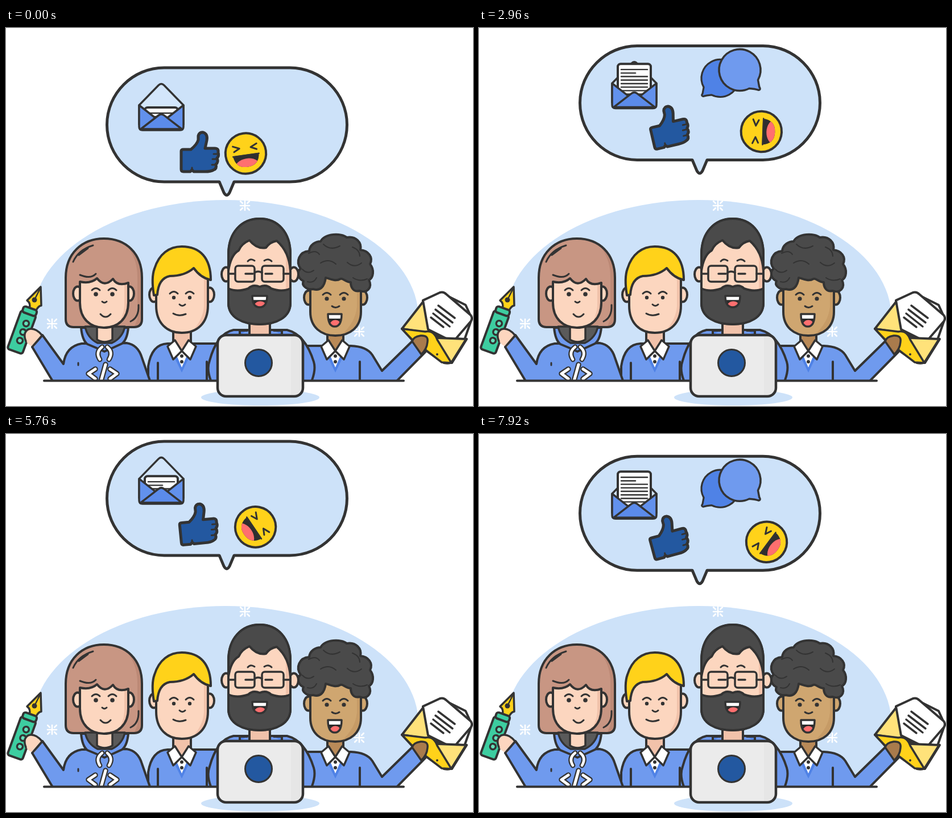
These frames come from a looping animation (821 by 666 pixels, 8000 ms). An HTML page with a canvas:

```html
<!DOCTYPE html>
<html lang="en">
<head>
<meta charset="utf-8">
<title>Team chat</title>
<style>
html, body { margin: 0; width: 100%; height: 100%; overflow: hidden; background: #fff; }
canvas { display: block; }
</style>
</head>
<body>
<canvas id="stage" width="821" height="666"></canvas>
<script>
const W = 821, H = 666, LOOP = 8000, STEP = 80, SWING = 2620;
const INK = '#333333', SKY = '#cde2f9', BLUE = '#6f9aee', DEEP = '#4f82e6', NAVY = '#2358a0';
const SKIN = '#fcd6bf', BLUSH = '#f1c2aa', TAN = '#cfa670', TANSHADE = '#b98a58';
const GOLD = '#ffd21a', LEMON = '#ffe27a', PINK = '#ff6f6f', COAL = '#4a4a4a', HAIR = '#c89683';

const view = document.getElementById('stage').getContext('2d');
let c = view;

function path(d, fill, line = 4, stroke = INK) {
  const p = new Path2D(d);
  if (fill) { c.fillStyle = fill; c.fill(p); }
  if (line) { c.lineWidth = line; c.strokeStyle = stroke; c.stroke(p); }
}
function oval(x, y, rx, ry, fill, line = 0) {
  c.beginPath();
  c.ellipse(x, y, rx, ry, 0, 0, Math.PI * 2);
  c.fillStyle = fill;
  c.fill();
  if (line) { c.lineWidth = line; c.strokeStyle = INK; c.stroke(); }
}
function box(x, y, w, h, r, fill, line = 4) {
  c.beginPath();
  c.roundRect(x, y, w, h, r);
  if (fill) { c.fillStyle = fill; c.fill(); }
  if (line) { c.lineWidth = line; c.strokeStyle = INK; c.stroke(); }
}
function at(x, y, deg, scale, draw) {
  c.save();
  c.translate(x, y);
  c.rotate(deg * Math.PI / 180);
  c.scale(scale, scale);
  draw();
  c.restore();
}
function clipped(d, draw) {
  c.save();
  c.clip(new Path2D(d));
  draw();
  c.restore();
}
function ears(x1, x2, y, fill) {
  for (const x of [x1, x2]) oval(x, y, 8, 12.5, fill, 4);
}
function eyes(x1, x2, y, r) {
  for (const x of [x1, x2]) {
    oval(x, y, r, r, INK);
    path(`M${x - 7} ${y - 7}Q${x} ${y - 14} ${x + 7} ${y - 7}`, null, 3);
  }
}
function head(d, fill, shade, edge) {
  path(d, fill, 0);
  clipped(d, () => path(`M${edge} 400V490Q${edge - 2} 520 ${edge - 32} 545H${edge + 40}V400Z`, shade, 0));
  path(d, null, 4);
}
function collar(x) {
  path(`M${x - 20} 566L${x} 607L${x + 20} 566Z`, DEEP, 0);
  path(`M${x - 12} 570L${x} 598L${x + 12} 570Z`, '#fff', 0);
  path(`M${x - 12} 550L${x - 25} 561L${x - 15} 584L${x} 569Z`, '#fff', 3.5);
  path(`M${x + 12} 550L${x + 25} 561L${x + 15} 584L${x} 569Z`, '#fff', 3.5);
  oval(x, 578, 3, 3, INK);
  oval(x, 588, 3, 3, INK);
}
function laugh(x, y, w, h) {
  const d = `M${x - w} ${y}H${x + w}Q${x + w} ${y + h} ${x} ${y + h}Q${x - w} ${y + h} ${x - w} ${y}Z`;
  path(d, '#2b2b2b', 0);
  clipped(d, () => {
    box(x - w, y, w * 2, h * .36, 0, '#fff', 0);
    oval(x + 1, y + h, w * .9, h * .52, PINK);
  });
  path(d, null, 3.5);
}
function sparkle(x, y) {
  for (let i = 0; i < 8; i++) at(x, y, i * 45, 1, () =>
    path(i % 2 ? 'M6 0H11' : 'M1 0H8', null, 2.6, '#fff'));
}

function blondBoy() {
  path('M250 630V596Q256 557 284 556H368L375 630Z', BLUE);
  path('M294 530V560L309 571L325 560V530Z', BLUSH);
  collar(309);
  path('M267 590V624M353 588V624', null);
  ears(260, 358, 470, SKIN);
  head('M264 435V489C264 520 283 537 309 537C336 537 355 520 355 489V435Q308 405 264 435Z', SKIN, BLUSH, 348);
  path('M260 471Q255 440 261 424C269 398 287 385 309 385C341 385 360 405 360 444Q342 440 330 423Q314 437 288 437Q268 441 266 470Z', GOLD);
  eyes(295, 323, 475, 3.2);
  path('M305 487Q310 492 315 487M294 503Q304 509 316 504', null, 3);
}

function penGirl() {
  const hair = 'M105 513V440C105 397 134 371 172 371C211 371 239 397 239 440V513Q239 527 225 527H119Q105 527 105 513Z';
  path(hair, HAIR, 0);
  clipped(hair, () => path('M212 384Q231 405 231 440V513L224 530H242V384Z', '#bc8976', 0));
  path(hair, null);
  path('M85 627L46 562L64 541L101 592Q105 561 133 556L212 555Q232 558 239 581L255 627Z', BLUE);
  path('M132 528Q134 550 143 557Q158 563 173 570Q189 563 204 556Q213 549 215 528Z', BLUE);
  path('M139 526Q143 546 161 555H186Q205 546 209 526Z', '#5a5a5a', 3.5);
  path('M160 520V549Q173 557 187 549V520Z', SKIN, 3.5);
  ears(126, 217, 468, SKIN);
  head('M130 447Q149 451 160 441Q173 458 188 442Q196 456 215 449V484C215 512 197 528 172 528C148 528 130 512 130 484Z', SKIN, BLUSH, 208);
  path('M130 435Q149 443 158 433M118 412Q127 391 153 383M128 400L144 388M233 488Q234 510 219 517', null, 3);
  eyes(158, 187, 469, 3.8);
  path('M169 482Q173 486 177 482M166 504Q175 514 184 504', null, 3);
  for (const [line, tone] of [[9, INK], [4.5, '#fff']]) {
    path('M169 562Q157 571 165 584M178 562Q189 571 181 584', null, line, tone);
    path('M157 601L145 609L157 618M183 601L195 609L183 618M175 593L167 622', null, line + .5, tone);
  }
  path('M127 590V594', null, 3);
  path('M61 456L37 480Q44 485 41 494L53 498Q56 490 62 489Z', GOLD, 3.5);
  path('M60 459L51 477', null, 2.5);
  oval(50, 479, 4.5, 4.5, INK);
  at(28, 535, 20, 1, () => {
    box(-14, -35, 28, 72, 4, '#3dcda0');
    box(-12, -44, 25, 11, 4, '#3dcda0');
    for (const y of [-16, 0, 16]) oval(2, y, 5, 5, '#65dfba', 3.5);
  });
  path('M49 562Q33 557 33 541Q36 528 49 530Q58 532 64 541Z', SKIN, 0);
  path('M35 552Q29 537 39 531Q51 527 63 541M46 562L64 541', null, 3.5);
}

function curlyMan() {
  path('M520 630V560H606Q634 561 644 576L661 604L714 552L737 571L681 628L660 630Z', BLUE);
  path('M565 530V558L579 571L593 558V530Z', TANSHADE);
  collar(579);
  path('M622 588V624', null);
  ears(532, 627, 475, TAN);
  head('M535 440V500C535 527 554 542 579 542C605 542 624 527 624 500V440Z', TAN, '#c69b66', 617);
  path('M540 460C528 462 519 453 523 446C511 440 512 428 518 424C509 412 515 394 533 393C534 382 544 376 553 376C561 361 590 361 599 369C615 366 626 378 623 391C637 392 646 404 640 416C648 426 646 440 638 444C645 458 634 468 622 463C610 466 606 456 606 448C598 448 592 440 588 442C578 448 566 440 562 440C560 456 552 464 540 460Z', COAL);
  path('M532 397Q545 390 551 399M558 381Q570 393 587 384M609 386Q622 391 622 402M521 425Q530 435 541 427M553 414Q568 405 580 416M600 413Q612 424 625 414M530 447Q541 450 546 440M610 440Q622 448 635 442', null, 2, '#333');
  eyes(564, 594, 477, 3.6);
  path('M573 490Q579 495 586 490', null, 3);
  laugh(578, 504, 12, 22);
}

function mailHand() {
  path('M733 480L764 466L808 488L819 512L806 549L740 540Z', '#fff');
  path('M696 530L735 480L747 540Z', LEMON);
  path('M733 480L763 466Q769 464 774 469L817 506Q821 511 817 517L786 553L742 531Z', '#fff');
  path('M760 489L789 511M755 496L785 519M751 503L780 526M747 510L769 527', null, 3.5);
  path('M810 548L784 590L755 548Z', LEMON);
  path('M696 530L741 537Q754 532 758 546L809 548L784 588Q780 592 770 590L718 554Z', LEMON);
  path('M696 530L737 535Q752 532 758 549L783 590L766 589L714 549Z', GOLD, 3.5);
  oval(758, 575, 2, 2, INK);
  path('M714 552Q716 544 729 542Q743 541 741 553Q740 566 730 575Z', '#a97b4c', 3.5);
}

function beardMan() {
  path('M400 532H494Q526 540 541 588Q546 604 534 630H364Q351 604 358 586Q371 538 400 532Z', BLUE);
  path('M411 541V533H424M485 541V533H471', DEEP, 4);
  path('M428 510V542H464V510Z', BLUSH);
  ears(387, 506, 434, SKIN);
  head('M391 400C391 360 415 336 446 336C478 336 500 360 500 400V484C500 509 475 522 446 522C416 522 391 509 391 484Z', SKIN, BLUSH, 492);
  path('M391 428V398C391 360 414 336 446 336C478 336 500 360 500 398V428Q498 394 476 375Q464 377 457 387Q441 390 428 374Q414 380 409 392Q395 400 391 428Z', COAL);
  path('M391 459Q406 466 426 459Q434 451 446 456Q458 451 466 459Q485 466 500 459V485C500 510 475 522 446 522C416 522 391 510 391 485Z', COAL);
  path('M425 411Q430 405 437 410M454 410Q461 405 467 411', null, 3);
  box(403, 419, 34, 28, 5, null, 3.5);
  box(450, 419, 38, 28, 5, null, 3.5);
  path('M437 431Q443 427 450 431M391 433H402M488 433H500M421 433H434M456 433H468', null, 3.5);
  laugh(446, 472, 13, 20);
}

function laptop() {
  oval(447, 651, 104, 14, SKY);
  box(372, 541, 150, 108, 15, '#ebebeb', 0);
  box(501, 543, 20, 104, [0, 14, 14, 0], '#e6e6e6', 0);
  box(372, 541, 150, 108, 15, null, 4.5);
  oval(444, 590, 23.5, 23.5, NAVY, 3);
}

function scene() {
  clipped('M0 0H821V620H0Z', () => {
    oval(386, 510, 339, 207, SKY);
    sparkle(420, 313);
    sparkle(81, 521);
    sparkle(621, 535);
    blondBoy();
    penGirl();
    curlyMan();
    mailHand();
    beardMan();
  });
  path('M67 621.5H699', null, 4);
  laptop();
}

function mail(rise) {
  path('M234 136L268 101Q273 96 278 101L312 136V170H234Z', '#d3e6fb', 3.5);
  clipped('M230 60H316V176H230Z', () => {
    const top = 140 - rise;
    box(244, top, 58, 75, 5, '#fff', 4);
    for (let i = 0; i < 8; i++) {
      const y = top + 10 + i * 6.2;
      path(`M250 ${y}H${i === 1 ? 275 : 296}`, null, 2.4);
    }
  });
  path('M234 136L262 158L273 152L284 158L312 136V174Q312 180 306 180H240Q234 180 234 174Z', '#6291ec', 3.5);
  path('M237 178L268 154Q273 150 278 154L309 178Z', '#5b8bea', 3.5);
}

function thumb(deg) {
  at(307, 245, -deg, 1, () => {
    c.translate(-307, -245);
    path('M308 217Q308 214 312 214H325Q336 205 338 197V190Q340 183 347 184Q355 187 353 198L350 212H367Q374 212 373 219Q375 226 371 229Q374 237 369 240Q371 248 365 250Q360 253 350 253H330L327 250L324 253H312Q308 253 308 249Z', NAVY, 5);
    path('M365 222H372M363 231H371M362 241H369M327 246V250', null, 3);
  });
}

function face(x, deg) {
  at(x, 221, deg, 1, () => {
    oval(0, 0, 35.7, 35.7, GOLD, 4);
    path('M-21 -15L-10 -10L-20 -5M21 -15L10 -10L20 -5', null, 3);
    const grin = 'M-23 2H23Q21 24 0 24Q-21 24 -23 2Z';
    path(grin, '#2f2f2f', 0);
    clipped(grin, () => oval(0, 24, 22, 15, PINK));
    path('M-23 3H23', null, 2.5);
  });
}

function chat(x, y, cx, cy, r, size, fill, flip) {
  if (size <= 0) return;
  at(x, y, 0, size, () => {
    c.translate(cx - x, cy - y);
    c.scale(flip * r / 33, r / 33);
    c.beginPath();
    c.arc(0, 0, 33, Math.PI * .84, Math.PI * 2.65);
    c.quadraticCurveTo(-24, 30, -30, 32);
    c.quadraticCurveTo(-34, 31, -31, 27);
    c.closePath();
    c.fillStyle = fill;
    c.fill();
    c.lineWidth = 3.2 / Math.sqrt(Math.max(size, .1));
    c.strokeStyle = INK;
    c.stroke();
  });
}

const ramp = (t, from, span) => Math.min(1, Math.max(0, (t - from) / span));
function keyed(t, keys) {
  let i = 1;
  while (i < keys.length - 1 && t > keys[i][0]) i++;
  const [a, u] = keys[i - 1], [b, v] = keys[i];
  return u + (v - u) * ramp(t, a, b - a);
}
const drift = [[0, 0], [132, 1.6], [4958, -66.9], [8000, -29.8]];
const tilt = [[0, 0], [1250, 13.5], [2240, 12.4], [2620, 15.6], [3760, 7], [5040, 2.6], [5240, 0]];

function bubble(t) {
  const phase = t % (SWING * 2);
  const swing = 1 - Math.abs(phase / SWING - 1);
  const fade = 1 - ramp(phase, 3600, 350);
  c.save();
  c.translate(0, keyed(t, drift));
  path('M278 70H499C554 70 599.5 115 599.5 170.5C599.5 226 554 271 499 271H401L393 290Q388 299 383 290L375 271H278C223 271 177.5 226 177.5 170.5C177.5 115 223 70 278 70Z', SKY, 5);
  mail(swing * 44);
  thumb(keyed(phase, tilt));
  chat(392, 156, 424, 127, 33, ramp(phase, 1075, 180) * fade, DEEP, 1);
  chat(489.5, 143, 458.5, 112.5, 36.5, ramp(phase, 1158, 70) * fade, BLUE, -1);
  face(421.5 + swing * 86, -8 + swing * 322);
  c.restore();
}

const still = document.createElement('canvas');
still.width = W;
still.height = H;
c = still.getContext('2d');
c.lineJoin = c.lineCap = 'round';
scene();
c = view;
c.lineJoin = c.lineCap = 'round';

const start = performance.now();
function frame() {
  const t = (performance.now() - start) % LOOP;
  c.fillStyle = '#fff';
  c.fillRect(0, 0, W, H);
  c.drawImage(still, 0, 0);
  bubble(Math.floor(t / STEP) * STEP);
  requestAnimationFrame(frame);
}
frame();
</script>
</body>
</html>
```
